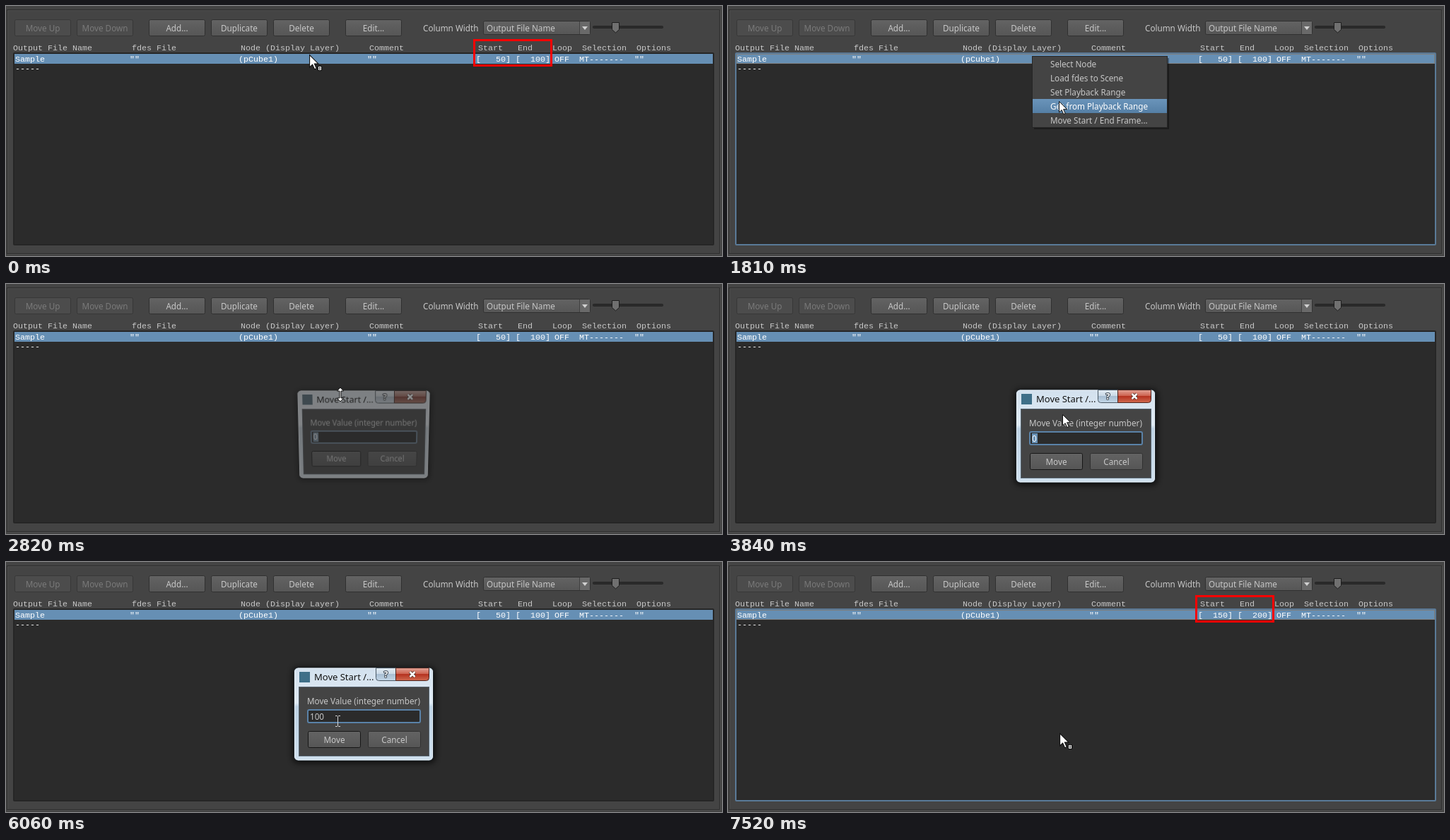
An HTML page for the animation above (9.32 s loop, 1013 by 355 pixels).

```html
<!DOCTYPE html>
<html lang="en">
<head>
<meta charset="utf-8">
<title>Move start and end</title>
<style>
html, body { margin: 0; width: 100%; height: 100%; overflow: hidden; background: #444; }
svg { position: absolute; left: 0; top: 0; width: 1013px; height: 355px; }
#dialog { transform-origin: 506px 216px; }
text { font: 11.7px "Noto Sans", "Open Sans", sans-serif; fill: #c8c8c8; white-space: pre; }
.mono { font: 11.667px "Liberation Mono", "Courier New", monospace; }
.row { fill: #fff; }
.off { fill: #7a7a7a; }
.mid { text-anchor: middle; }
.title { font-size: 13px; fill: #111; }
</style>
</head>
<body>
<svg id="stage" viewBox="0 0 1013 355">
  <defs>
    <linearGradient id="btn" x2="0" y2="1"><stop stop-color="#636363"/><stop offset="1" stop-color="#565656"/></linearGradient>
    <linearGradient id="hover" x2="0" y2="1"><stop stop-color="#757575"/><stop offset="1" stop-color="#686868"/></linearGradient>
    <linearGradient id="pick" x2="0" y2="1"><stop stop-color="#6a94ba"/><stop offset="1" stop-color="#557fa5"/></linearGradient>
    <linearGradient id="glass" x2="0" y2="1"><stop stop-color="#d3e1ee"/><stop offset=".38" stop-color="#dfeaf4"/><stop offset=".42" stop-color="#bdd2e4"/><stop offset="1" stop-color="#cfe0ee"/></linearGradient>
    <linearGradient id="red" x2="0" y2="1"><stop stop-color="#e3a497"/><stop offset=".48" stop-color="#cc5f4c"/><stop offset=".5" stop-color="#b5321f"/><stop offset="1" stop-color="#cf6a50"/></linearGradient>
    <linearGradient id="help" x2="0" y2="1"><stop stop-color="#e4edf5"/><stop offset=".48" stop-color="#c9d8e6"/><stop offset=".5" stop-color="#a8bed2"/><stop offset="1" stop-color="#c3d7e8"/></linearGradient>
    <filter id="blur" x="-20%" y="-20%" width="140%" height="140%"><feGaussianBlur stdDeviation="4"/></filter>
  </defs>
</svg>
<svg id="dialog" viewBox="0 0 1013 355"></svg>
<svg id="top" viewBox="0 0 1013 355"></svg>
<script>
const LOOP = 9320;
const $ = id => document.getElementById(id);

function add(parent, tag, attrs = {}, label) {
  const el = document.createElementNS("http://www.w3.org/2000/svg", tag);
  for (const key in attrs) el.setAttribute(key, attrs[key]);
  if (label !== undefined) el.textContent = label;
  parent.appendChild(el);
  return el;
}
const box = (p, x, y, width, height, fill, more) => add(p, "rect", { x, y, width, height, fill, ...more });
const write = (p, x, y, label, cls = "") => add(p, "text", { x, y, class: cls }, label);
const path = (p, d, fill, more) => add(p, "path", { d, fill, ...more });
const show = (el, on) => { el.style.display = on ? "" : "none"; };

function button(p, x, y, w, label, { off = false, stroke = "#303030" } = {}) {
  const face = box(p, x + .5, y + .5, w - 1, 23, off ? "#4c4c4c" : "url(#btn)",
    { rx: 2, stroke: off ? "#373737" : stroke });
  write(p, x + w / 2, y + 16.5, label, off ? "mid off" : "mid");
  return face;
}

// Main panel
const stage = $("stage");
box(stage, 0, 0, 1013, 355, "#444");
box(stage, 2.5, 6.5, 1008, 346, "none", { stroke: "#4e4e4e" });
box(stage, 1.5, 5.5, 1008, 346, "none", { stroke: "#2d2d2d" });
[["Move Up", 12, true], ["Move Down", 100, true], ["Add...", 202], ["Duplicate", 290],
 ["Delete", 378], ["Edit...", 480]].forEach(([label, x, off]) => button(stage, x, 19, 80, label, { off }));

write(stage, 590, 35.5, "Column Width");
box(stage, 675.5, 21.5, 151, 19, "url(#btn)", { rx: 2, stroke: "#303030" });
box(stage, 811, 22, 15, 18, "#696969");
box(stage, 811, 22, 1, 18, "#404040");
path(stage, "M815 29h8l-4 5z", "#d0d0d0");
write(stage, 680, 35.5, "Output File Name");
box(stage, 830.5, 28.5, 99, 3, "#2b2b2b", { rx: 1, stroke: "#262626" });
path(stage, "M857.5 23.5h10v10l-5 4.5l-5-4.5z", "#707070", { stroke: "#1e1e1e" });

[[10, "Output File Name"], [178, "fdes File"], [332, "Node (Display Layer)"], [514, "Comment"], [668, "Start"],
 [724, "End"], [773, "Loop"], [815, "Selection"], [892, "Options"]].forEach(([x, s]) => write(stage, x, 63, s, "mono"));

const list = box(stage, 11, 67, 990, 272, "#2b2b2b", { rx: 1, "stroke-width": 2 });
box(stage, 12, 68, 988, 14, "#668fb4");
const rowFocus = box(stage, 12.5, 68.5, 987, 13, "none", { stroke: "#99704b", "stroke-dasharray": "1 1" });
const cell = (x, s) => write(stage, x, 79, s, "mono row");
[[13, "Sample"], [175, '""'], [329, "(pCube1)"], [511, '""'], [776, "OFF"],
 [811, "MT-------"], [889, '""']].forEach(([x, s]) => cell(x, s));
const start = cell(665, "");
const end = cell(721, "");
write(stage, 13, 92, "-----", "mono row");
const mark = box(stage, 662.5, 48.5, 109, 36, "none", { stroke: "#f00", "stroke-width": 3 });

// Context menu
const menu = add(stage, "g");
box(menu, 433, 74, 191, 101, "#000", { opacity: .35 });
box(menu, 430.5, 71.5, 191, 101, "#444", { stroke: "#262626" });
const pick = box(menu, 431, 0, 190, 20, "url(#pick)");
const items = ["Select Node", "Load fdes to Scene", "Set Playback Range", "Get from Playback Range",
  "Move Start / End Frame..."].map((s, i) => write(menu, 456, 87 + 20 * i, s));

// Dialog
const dialog = $("dialog");
box(dialog, 406, 150, 201, 135, "#000", { rx: 7, opacity: .75, filter: "url(#blur)" });
box(dialog, 407.5, 150, 197, 132, "url(#glass)", { rx: 6, stroke: "#1c242b" });
box(dialog, 408.5, 151, 195, 130, "none", { rx: 5, stroke: "#f2f8fc", opacity: .8 });
box(dialog, 415, 156, 15, 15, "#3f6f88");
write(dialog, 436, 168, "Move Start /...", "title");
path(dialog, "M523.5 150.5h28v18h-24q-4 0-4-4z", "url(#help)", { stroke: "#4c5a66" });
path(dialog, "M551.5 150.5h47v14q0 4-4 4h-43z", "url(#red)", { stroke: "#4c2620" });
add(dialog, "text", { x: 537.5, y: 164, class: "mid", style: "font-weight:700;fill:#fff;stroke:#44505c;stroke-width:2px;paint-order:stroke" }, "?");
for (const [stroke, width] of [["#54352f", 4.5], ["#fff", 2.5]])
  path(dialog, "M571.5 156l7 7m0-7l-7 7", "none", { stroke, "stroke-width": width });
box(dialog, 414.5, 177.5, 184, 98, "#444", { stroke: "#56636e" });
write(dialog, 426, 202, "Move Value (integer number)");
const field = box(dialog, 427, 210, 159, 18, "#2b2b2b", { rx: 2, "stroke-width": 2 });
const sel = box(dialog, 430, 212, 8, 14, "#668fb4");
const value = write(dialog, 430, 223.5, "");
const caret = box(dialog, 0, 212, 1, 14, "#d8d8d8");
const move = button(dialog, 427, 240, 75, "Move", { stroke: "#161616" });
button(dialog, 512, 240, 75, "Cancel");

// Pointers
const overlay = $("top");
const ARROW = "M.5 .5V16L4.1 12.6L6.8 18.6L9.2 17.6L6.6 11.7H11.6Z";
const pointers = { arrow: add(overlay, "g"), menu: add(overlay, "g"), size: add(overlay, "g"), beam: add(overlay, "g") };
path(pointers.arrow, ARROW, "#fff", { stroke: "#111" });
path(pointers.menu, ARROW, "#fff", { stroke: "#111", transform: "scale(1.12)" });
box(pointers.menu, 12.5, 16.5, 5, 6, "#fff", { stroke: "#111" });
path(pointers.menu, "M14 18.5h2m-2 2h2", "none", { stroke: "#111" });
path(pointers.size, "M0-10l4.5 5h-3.5v10h3.5l-4.5 5l-4.5-5h3.5v-10h-3.5z", "#fff", { stroke: "#111" });
path(pointers.beam, "M-3.5-7.5h2.5l1 1l1-1h2.5M0-6.5v13M-3.5 7.5h2.5l1-1l1 1h2.5", "none", { stroke: "#d8d8d8" });

// The window tilts, shrinks, fades and greys together
const tilt = (dy, deg, sx, sy) => `translateY(${dy}px) perspective(600px) rotateX(${deg}deg) scale(${sx},${sy})`;
const FAR = tilt(-1.5, -9, .94, .957);
const POSE = {
  far: { opacity: .47, transform: FAR, filter: "saturate(.5)" },
  near: { opacity: .88, transform: tilt(-.3, -2, .985, .99), filter: "saturate(.9)" },
  gone: { opacity: .25, transform: FAR, filter: "saturate(.5)" },
  full: { opacity: 1, transform: "none", filter: "none" }
};

// Each step changes only what it names
const STEPS = [
  [0, { ptr: "menu", at: [429, 69], range: [50, 100], mark: true, menu: false, item: -1, focus: false, pose: null,
        sel: false, text: "0", caret: false, field: true, face: "btn" }],
  [1000, { mark: false, menu: true, focus: true }],
  [1390, { ptr: "arrow", at: [444, 79], item: 0 }],
  [1610, { at: [454, 88] }],
  [1810, { at: [468, 135], item: 3 }],
  [2010, { at: [470, 149] }],
  [2210, { at: [471, 157], item: 4 }],
  [2820, { ptr: "size", at: [473, 157], menu: false, focus: false, pose: "far", sel: true }],
  [3040, { pose: "near" }],
  [3240, { pose: "full" }],
  [3420, { sel: false }],
  [3840, { ptr: "arrow", at: [473, 185], sel: true }],
  [4060, { ptr: "beam", at: [475.5, 213] }],
  [4240, { at: [469.5, 214] }],
  [4440, { sel: false }],
  [5040, { text: "1", caret: true }],
  [5260, { text: "10" }],
  [5460, { text: "100" }],
  [6060, { at: [469.5, 226], caret: false }],
  [6280, { ptr: "arrow", at: [469, 241], face: "hover" }],
  [6500, { at: [469, 243], caret: true }],
  [7080, { caret: false, field: false, face: "press" }],
  [7300, { ptr: "menu", focus: true, pose: "gone", range: [150, 200] }],
  [7520, { mark: true, pose: null }]
];
const states = [];
for (const [, change] of STEPS) states.push({ ...states.at(-1), ...change });

const FACES = { btn: "url(#btn)", hover: "url(#hover)", press: "#303030" };

function draw(s) {
  list.setAttribute("stroke", s.focus ? "#5a7a98" : "#262626");
  show(rowFocus, s.focus);
  start.textContent = `[${String(s.range[0]).padStart(5)}]`;
  end.textContent = `[${String(s.range[1]).padStart(5)}]`;
  show(mark, s.mark);
  show(menu, s.menu);
  show(pick, s.item >= 0);
  pick.setAttribute("y", 72 + 20 * s.item);
  items.forEach((el, i) => { el.style.fill = i === s.item ? "#fff" : ""; });

  show(dialog, s.pose);
  if (s.pose) Object.assign(dialog.style, POSE[s.pose]);
  show(sel, s.sel);
  value.textContent = s.text;
  value.style.fill = s.sel ? "#fff" : "";
  show(caret, s.caret);
  caret.setAttribute("x", 430 + 7 * s.text.length);
  field.setAttribute("stroke", s.field ? "#5a82a8" : "#2b2b2b");
  move.setAttribute("fill", FACES[s.face]);

  for (const name in pointers) show(pointers[name], name === s.ptr);
  pointers[s.ptr].setAttribute("transform", `translate(${s.at})`);
}

const t0 = performance.now();
let shown = -1;
function tick() {
  const t = (performance.now() - t0) % LOOP;
  const i = STEPS.findLastIndex(([at]) => at <= t);
  if (i !== shown) draw(states[shown = i]);
  requestAnimationFrame(tick);
}
tick();
</script>
</body>
</html>
```
